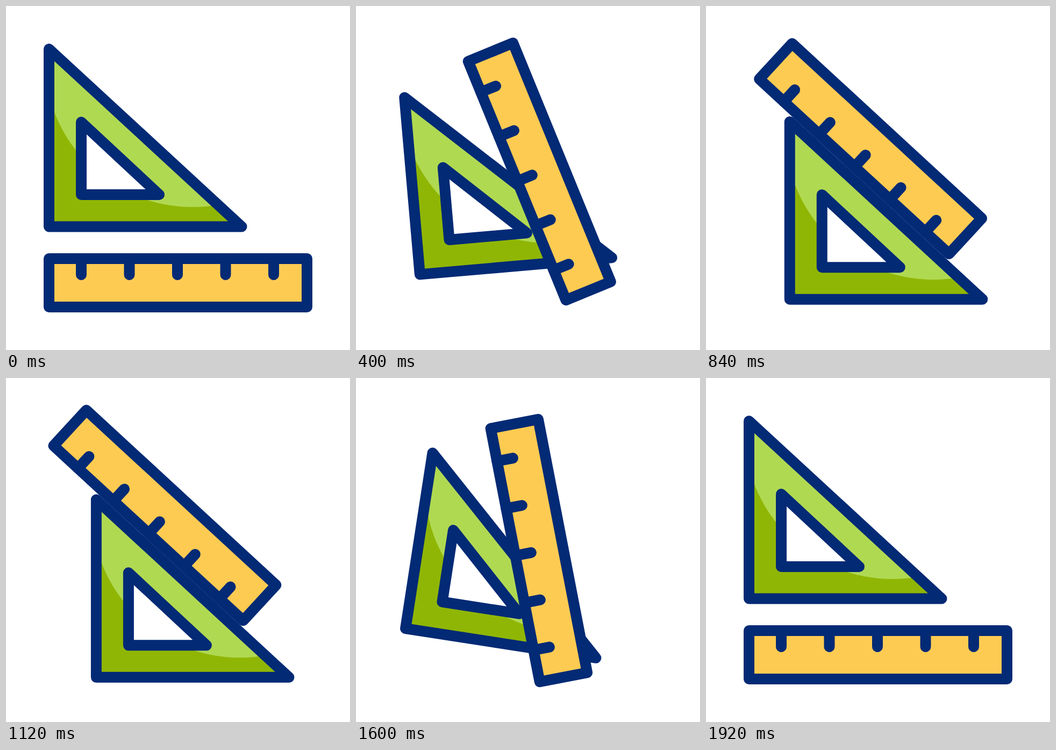
Write an HTML page that moves like this. It is 640 by 640 pixels and loops after 2 s.

```html
<!DOCTYPE html>
<html lang="en">
<head>
<meta charset="utf-8">
<title>Set square and ruler</title>
<style>
  html, body { margin: 0; width: 100%; height: 100%; overflow: hidden; background: #fff; }
  svg { display: block; width: 100%; height: 100%; }
  .line { fill: none; stroke: #032a75; stroke-width: 20; stroke-linejoin: round; stroke-linecap: round; }
</style>
</head>
<body>
<svg viewBox="0 0 640 640">
  <defs>
    <clipPath id="body"><path d="M80 80V410.5H438.5Z"/></clipPath>
  </defs>
  <g id="square">
    <path fill="#90b605" d="M80 80V410.5H438.5Z"/>
    <circle cx="347" cy="98.4" r="275.6" fill="#b0d952" clip-path="url(#body)"/>
    <path fill="#fff" d="M140 216V351H285Z"/>
    <path class="line" d="M80 80V410.5H438.5ZM140 216V351H285Z"/>
  </g>
  <g id="ruler">
    <path fill="#fecb52" d="M80 470H560V560H80Z"/>
    <path class="line" d="M80 470H560V560H80Z"/>
    <path class="line" id="ticks"/>
  </g>
</svg>
<script>
  const LOOP = 2000, STEP = 40;
  const SLOPE = Math.atan2(330.5, 358.5); // angle of the long edge
  const FLIP = SLOPE * 180 / Math.PI - 180; // ruler turn that lays its ticks on that edge

  const square = document.getElementById("square");
  const ruler = document.getElementById("ruler");

  let marks = "";
  for (let i = 0; i < 5; i++) marks += `M${140 + 89.5 * i} 470v30`;
  document.getElementById("ticks").setAttribute("d", marks);

  // Moves a part by a share of its shift, slides it along the edge and turns it on its pivot.
  function place(part, pivot, shift, move, slide, turn) {
    const x = shift[0] * move + Math.cos(SLOPE) * slide;
    const y = shift[1] * move + Math.sin(SLOPE) * slide;
    part.setAttribute("transform", `translate(${x} ${y}) rotate(${turn} ${pivot})`);
  }

  function pose(step) {
    const ease = (from, to) => {
      const t = Math.min(1, Math.max(0, (step - from) / (to - from)));
      return t * t * (3 - 2 * t);
    };
    const bump = (from, top, to) => ease(from, top) - ease(top, to);

    const slide = bump(18.1, 24, 33.8);

    const squareMove = ease(2, 13.2) - ease(36.3, 48);
    const tilt = 11.85 * bump(36, 42, 48) - 10.2 * bump(2, 7, 12.9);
    place(square, [199.5, 300.3], [36, 98.5], squareMove, 111 * slide, tilt);

    // The ruler lifts early and drops late, so it swings clear of the square.
    const lift = 0.63 * ease(2, 7) + 0.37 * ease(7, 10.9);
    const drop = 0.25 * ease(37.5, 42.9) + 0.75 * ease(42.9, 48);
    const turn = FLIP * (ease(2, 13) - ease(36, 47.85));
    place(ruler, [316.65, 514.2], [26.5, -213.5], lift - drop, -98 * slide, turn);
  }

  function draw() {
    pose(Math.floor((performance.now() % LOOP) / STEP));
    requestAnimationFrame(draw);
  }
  draw();
</script>
</body>
</html>
```
